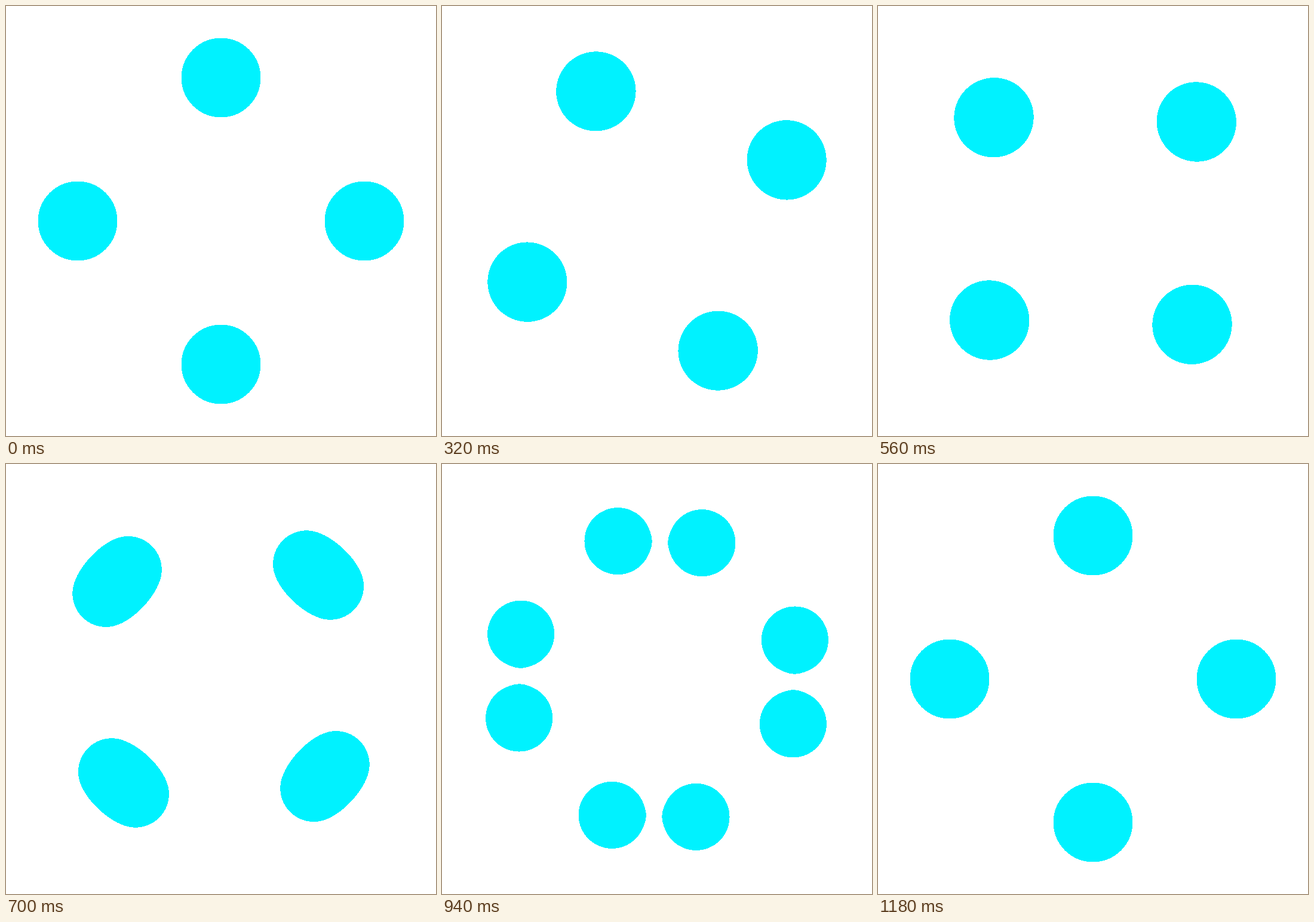
Animation, 720 px wide and 720 px high, one loop 1200 ms. Source, as an HTML page with a canvas:

```html
<!DOCTYPE html>
<html lang="en">
<head>
<meta charset="utf-8">
<title>Merging dots</title>
<style>
  html, body { margin: 0; width: 100%; height: 100%; overflow: hidden; background: #fff; }
  canvas { display: block; width: 720px; height: 720px; }
</style>
</head>
<body>
<canvas id="stage" width="720" height="720"></canvas>
<script>
const SIZE = 720, MID = SIZE / 2, RING = 240;
const LOOP = 1200, STEP = 20, END = 1180, TURN = 580;
const CORE = 19, REACH = 93;            // soft edge of a dot, in px
const CYAN = 0xfffff200, WHITE = 0xffffffff;   // ABGR

const ctx = document.getElementById('stage').getContext('2d');
const image = ctx.createImageData(SIZE, SIZE);
const pixels = new Uint32Array(image.data.buffer);
const clear = new Float32Array(SIZE * SIZE);   // share of light each pixel lets through

const smooth = u => u * u * (3 - 2 * u);

// One set turns steadily through 90 degrees, the other eases to 45 and back.
const steady = t => 90 * t / END;
const swing = t => 45 * (t < TURN ? smooth(t / TURN) : 1 - smooth((t - TURN) / (END - TURN)));

function addDot(degrees) {
  const a = degrees * Math.PI / 180;
  const cx = MID - RING * Math.sin(a), cy = MID - RING * Math.cos(a);
  const x0 = Math.max(0, Math.floor(cx - REACH)), x1 = Math.min(SIZE, Math.ceil(cx + REACH));
  const y0 = Math.max(0, Math.floor(cy - REACH)), y1 = Math.min(SIZE, Math.ceil(cy + REACH));
  for (let y = y0; y < y1; y++) {
    const dy = y + 0.5 - cy;
    for (let x = x0; x < x1; x++) {
      const dx = x + 0.5 - cx;
      const d = Math.sqrt(dx * dx + dy * dy);
      if (d >= REACH) continue;
      clear[y * SIZE + x] *= d <= CORE ? 0 : smooth((d - CORE) / (REACH - CORE));
    }
  }
}

function draw(t) {
  clear.fill(1);
  for (let q = 0; q < 360; q += 90) {
    addDot(q + steady(t));
    addDot(q + swing(t));
  }
  for (let i = 0; i < pixels.length; i++) pixels[i] = clear[i] < 0.5 ? CYAN : WHITE;
  ctx.putImageData(image, 0, 0);
}

const start = performance.now();
let shown = -1;
function tick() {
  const now = (performance.now() - start) % LOOP;
  const t = Math.min(END, Math.floor(now / STEP) * STEP);
  if (t !== shown) draw(shown = t);
  requestAnimationFrame(tick);
}
tick();
</script>
</body>
</html>
```
